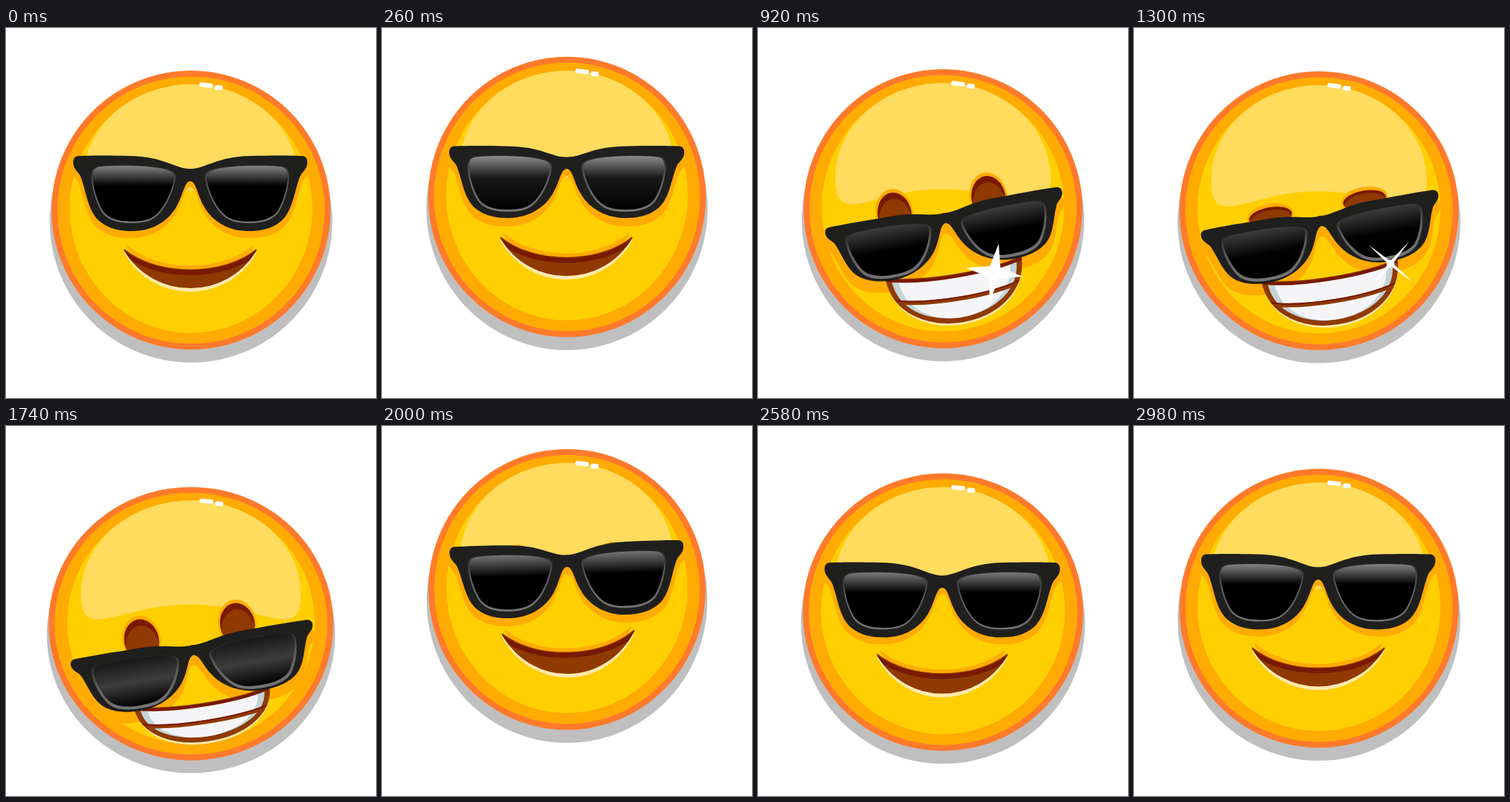
Recreate the animation shown at these times as an HTML page with a canvas. Size 512 px wide and 512 px high, loop 3000 ms.

```html
<!DOCTYPE html>
<html lang="en">
<head>
<meta charset="utf-8">
<title>Cool grin</title>
<style>
html, body { margin: 0; width: 100%; height: 100%; overflow: hidden; background: #fff; }
canvas { display: block; width: 512px; height: 512px; }
</style>
</head>
<body>
<canvas id="stage" width="512" height="512"></canvas>
<script>
const ctx = document.getElementById('stage').getContext('2d');
const LOOP = 3000;
const AMBER = '#ffab02', YELLOW = '#ffcf02', LIGHT = '#ffdb5e';
const DARK = '#781900', BROWN = '#8f3a00', FRAME = '#1f1f1d';

const mix = (a, b, k) => a + (b - a) * k;
const clamp = v => Math.min(1, Math.max(0, v));
const ramp = (t, a, b) => {
  const k = clamp((t - a) / (b - a));
  return k * k * (3 - 2 * k);
};
// Rises over one span of time and falls over another
const window4 = (t, a, b, c, d) => ramp(t, a, b) * (1 - ramp(t, c, d));

// Vertical motion: hop, springy landing, crouch, second hop, soft landing
const hop = (t, peak, half) => -27 * Math.max(0, 1 - ((t - peak) / half) ** 2);
function spring(t) {
  return t < 0 ? 0 : 33 * Math.exp(-t / 283) * Math.sin(2 * Math.PI * t / 720);
}
function sink(t) {
  return t < 0 ? 0 : 22 * (t / 130 * Math.exp(1 - t / 130)) ** 1.3;
}
function bounce(t) {
  const crouch = 22 * ramp(t, 1380, 1720) ** 2 * (1 - ramp(t, 1740, 1840));
  return hop(t, 360, 174) + spring(t - 534) + crouch + hop(t, 1960, 200) + sink(t - 2160);
}

function ellipse(x, y, rx, ry, fill) {
  ctx.beginPath();
  ctx.ellipse(x, y, rx, ry, 0, 0, Math.PI * 2);
  ctx.fillStyle = fill;
  ctx.fill();
}
function group(x, y, angle, draw) {
  ctx.save();
  ctx.translate(x, y);
  ctx.rotate(angle * Math.PI / 180);
  draw();
  ctx.restore();
}
function bar(x, y, w, h) {
  group(x, y, 6, () => {
    ctx.beginPath();
    ctx.roundRect(-w / 2, -h / 2, w, h, 2.5);
    ctx.fillStyle = '#fff';
    ctx.fill();
  });
}
function mirrored(draw) {
  for (const side of [1, -1]) {
    ctx.save();
    ctx.scale(side, 1);
    draw();
    ctx.restore();
  }
}

function drawHead() {
  ellipse(0, 15.5, 195.5, 195.5, 'rgba(0,0,0,0.25)');
  ellipse(0, 0, 193, 193, '#ff7a2b');
  ellipse(0, 0, 185, 185, AMBER);
  ellipse(0, -2, 168, 172, YELLOW);
  mirrored(() => {
    ctx.beginPath();
    ctx.moveTo(1, -174);
    ctx.bezierCurveTo(-82, -174, -149, -115, -149, -42);
    ctx.bezierCurveTo(-149, -14, -142, -6, -124, -6);
    ctx.bezierCurveTo(-92, -9, -60, -27, 1, -27);
    ctx.fillStyle = LIGHT;
    ctx.fill();
  });
  bar(21, -173, 19, 6);
  bar(38.5, -169.5, 11, 6.5);
}

// Left half of the frame; tilt flattens the brow and lowers the outer part
function halfFrame(tilt) {
  const y = (x, v) => v * mix(1, 0.84, tilt) + 7 * tilt * Math.min(1, -x / 60);
  const curve = (a, b, c, d, e, f) => ctx.bezierCurveTo(a, y(a, b), c, y(c, d), e, y(e, f));
  ctx.beginPath();
  ctx.moveTo(1, 0);
  curve(-22, 0, -34, -17, -85, -18);
  curve(-115, -19, -140, -18.5, -155, -18);
  curve(-160, -17.5, -162, -14, -162, -9);
  curve(-162, 0, -155, 4, -152, 10);
  curve(-144, 30, -142, 58, -126, 72);
  curve(-112, 84, -95, 86, -80, 86);
  curve(-50, 86, -28, 70, -18, 50);
  curve(-10, 36, -8, 17, 0, 17);
  ctx.lineTo(1, y(0, 17));
  ctx.closePath();
}
function lensPath() {
  ctx.beginPath();
  ctx.moveTo(-137, 12);
  ctx.bezierCurveTo(-137, -2, -134, -4, -120, -5);
  ctx.bezierCurveTo(-90, -7, -55, -5, -40, -2);
  ctx.bezierCurveTo(-26, 1, -20, 4, -20, 11);
  ctx.bezierCurveTo(-24, 35, -35, 55, -45, 64);
  ctx.bezierCurveTo(-55, 74, -70, 75, -82, 75);
  ctx.bezierCurveTo(-105, 75, -118, 68, -124, 57);
  ctx.bezierCurveTo(-132, 42, -136, 25, -137, 12);
}
function fillLens(top, at, mid, low) {
  const g = ctx.createLinearGradient(0, -6, 0, 75);
  const stop = (p, v) => g.addColorStop(p, `rgb(${v * 255},${v * 255},${v * 255})`);
  stop(0, top);
  stop(at, mid);
  stop(1, low);
  lensPath();
  ctx.fillStyle = g;
  ctx.fill();
}

function drawGlassesShadow({ gx, gy, angle, tilt }) {
  ctx.save();
  ctx.beginPath();
  ctx.ellipse(0, -2, 168, 172, 0, 0, Math.PI * 2);
  ctx.clip();
  group(gx, gy + mix(8, 14, tilt), angle, () => mirrored(() => {
    ctx.scale(mix(1.02, 1.05, tilt), 1.02);
    halfFrame(tilt);
    ctx.fillStyle = AMBER;
    ctx.fill();
  }));
  ctx.restore();
}
function drawGlasses({ gx, gy, angle, tilt, shine }) {
  group(gx, gy, angle, () => mirrored(() => {
    ctx.scale(mix(1, 1.028, tilt), 1);
    halfFrame(tilt);
    ctx.fillStyle = FRAME;
    ctx.fill();
    ctx.translate(0, 9.3 * tilt);
    ctx.scale(1, mix(1, 0.89, tilt));
    fillLens(0.14, 0.4, 0.36, 0.46);
    ctx.translate(-79, 33);
    ctx.scale(mix(0.965, 0.95, tilt), mix(0.955, 0.93, tilt));
    ctx.translate(79, mix(-33.5, -35, tilt));
    fillLens(...shine);
  }));
}

function drawEyes({ eyeY, angle, squint }) {
  const rx = mix(23.5, 30, squint), ry = mix(30, 13, squint);
  group(-2, eyeY, angle, () => {
    for (const x of [-66, 66]) {
      group(x, 0, 0, () => {
        ellipse(0, -1, rx + 2.5, ry + 4, AMBER);
        ellipse(0, 0, rx, ry, DARK);
        ctx.clip();
        ellipse(0, mix(9, 4, squint), rx - 1, ry, BROWN);
      });
    }
  });
}

function sagCurve(w, y, sag) {
  ctx.beginPath();
  ctx.moveTo(-w, y);
  ctx.bezierCurveTo(-w / 2, y + sag * 4 / 3, w / 2, y + sag * 4 / 3, w, y);
}
function mouthPath(w, sag, depth, round) {
  const bx = w * mix(0.55, 0.96, round);
  sagCurve(w, 0, sag);
  ctx.bezierCurveTo(bx, depth * 4 / 3, -bx, depth * 4 / 3, -w, 0);
  ctx.closePath();
}
function fillMouth(dy, color, ...shape) {
  group(0, dy, 0, () => {
    mouthPath(...shape);
    ctx.fillStyle = ctx.strokeStyle = color;
    ctx.lineWidth = 2;
    ctx.lineJoin = 'round';
    ctx.fill();
    ctx.stroke();
  });
}
function sagLine(w, y, sag, width, color) {
  sagCurve(w, y, sag);
  ctx.lineWidth = width;
  ctx.strokeStyle = color;
  ctx.stroke();
}
function drawMouth({ mouthX, mouthY, angle, w, sag, depth, teeth }) {
  group(mouthX, mouthY, angle * 0.92, () => {
    ctx.globalAlpha = 1 - teeth;
    fillMouth(-5, AMBER, w - 4, sag, depth, teeth);
    ctx.globalAlpha = 1;
    fillMouth(mix(5, 3, teeth), '#ffe9ae', w - 1, sag, depth, teeth);
    fillMouth(0, BROWN, w, sag, depth, teeth);
    mouthPath(w + 1, sag, depth, teeth);
    ctx.clip();
    ctx.globalAlpha = teeth;
    group(0, 4, 0, () => {
      mouthPath(w - 7, sag, depth - 10, teeth);
      ctx.fillStyle = '#c3d3d6';
      ctx.fill();
      mouthPath(w - 16, sag - 1, depth - 10, teeth);
      ctx.fillStyle = '#f5f5f7';
      ctx.fill();
    });
    sagLine(w - 2, depth * 0.43, depth * 0.15, 5.5, BROWN);
    sagLine(w - 2, depth * 0.43 - 2, depth * 0.15, 2, DARK);
    ctx.globalAlpha = 1;
    sagLine(w, 0, sag, mix(14, 9, teeth), DARK);
  });
}

function drawSparkle(t) {
  const size = window4(t, 740, 900, 1320, 1480);
  if (size <= 0) return;
  const u = (t - 920) / 380;
  const long = 40 * size, inner = mix(10.5, 3.5, clamp(u)) * size;
  group(mix(327, 355, u), mix(338, 326, u), mix(8.5, 40, u), () => {
    ctx.beginPath();
    for (let i = 0; i < 8; i++) {
      const a = i * Math.PI / 4, r = i % 2 ? inner : long;
      ctx.lineTo(r * Math.sin(a), -r * Math.cos(a));
    }
    ctx.fillStyle = '#fff';
    ctx.fill();
    ellipse(0, 0, 5.5 * size, 5.5 * size, '#fff');
  });
}

// Everything on the face follows a few eased controls and the bounce
function poseAt(t, shift) {
  const slide = window4(t, 200, 750, 1760, 2080);
  const lean = window4(t, 380, 700, 1780, 2080);
  const tilt = window4(t, 150, 450, 1780, 2100);
  const teeth = window4(t, 260, 420, 1860, 2000);
  const glow = window4(t, 150, 500, 500, 900);
  const press = Math.max(0, shift);
  return {
    tilt, teeth,
    angle: -10 * lean,
    gx: mix(-1, 1, tilt),
    gy: mix(-57, 6, slide) + press * 1.12,
    eyeY: mix(-33, -4, slide) + press * 0.75,
    squint: window4(t, 1040, 1260, 1380, 1620),
    mouthX: mix(-1, 14.5, lean),
    mouthY: mix(55, 81.5, slide) + press * mix(0.76, 1, lean),
    w: mix(91, 94.5, lean) - press * mix(0.3, 0.1, lean),
    sag: mix(28, 10, teeth) - press * 0.22 * (1 - lean),
    depth: mix(52, 75.5, lean) + press * mix(0.22, -0.6, lean),
    shine: [
      mix(0.52, 0.24, tilt) + 0.5 * glow - press * 0.007,
      mix(0.37, 0.5, tilt),
      0.4 * glow + press * 0.011 * lean,
      0.03 * glow
    ]
  };
}

function draw(t) {
  const shift = bounce(t);
  const squash = shift * (shift > 0 ? 0.18 : 0.05) / 193;
  const pose = poseAt(t, shift);
  ctx.fillStyle = '#fff';
  ctx.fillRect(0, 0, 512, 512);
  ctx.save();
  ctx.translate(256, 252 + shift);
  ctx.scale(1 + squash, 1 - squash);
  drawHead();
  drawGlassesShadow(pose);
  drawEyes(pose);
  drawMouth(pose);
  drawGlasses(pose);
  ctx.restore();
  drawSparkle(t);
}

const start = performance.now();
function tick() {
  draw((performance.now() - start) % LOOP);
  requestAnimationFrame(tick);
}
tick();
</script>
</body>
</html>
```
